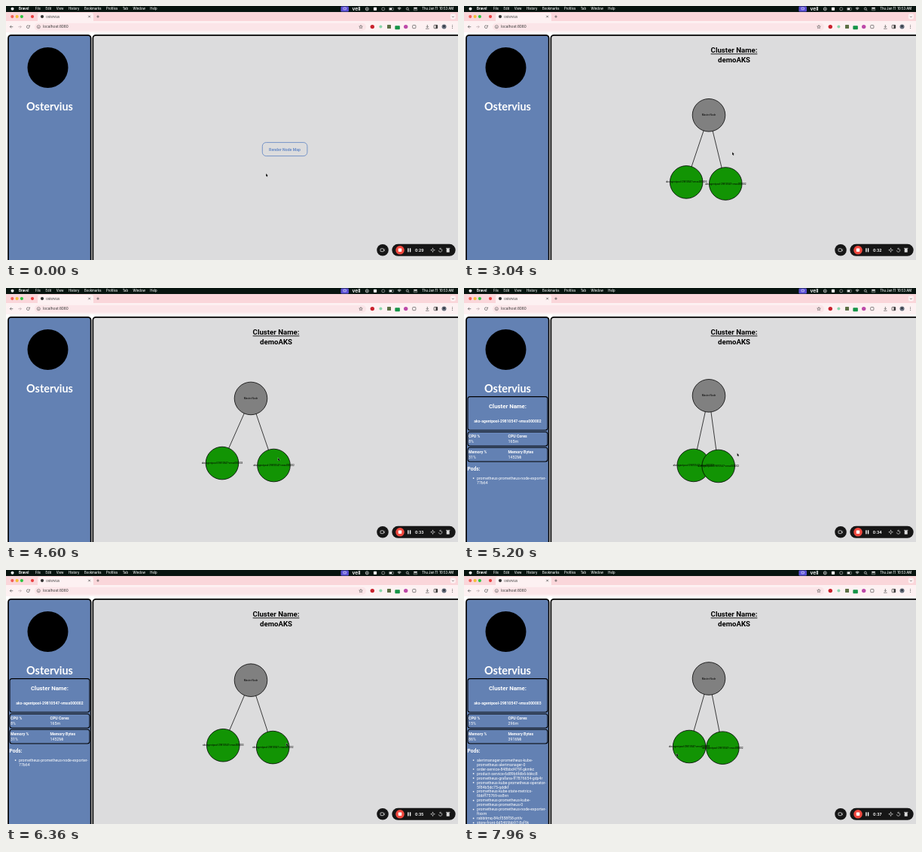
Animation, 600 px wide and 338 px high, one loop 8000 ms. Source, as an HTML page with a canvas:

```html
<!DOCTYPE html>
<html lang="en">
<head>
<meta charset="utf-8">
<title>Ostervius</title>
<style>
html, body { margin: 0; width: 100%; height: 100%; overflow: hidden; background: #fff; }
canvas { display: block; width: 600px; height: 338px; }
</style>
</head>
<body>
<canvas id="stage"></canvas>
<script>
const LOOP = 8000;
const APP = 'Ostervius';
const SANS = 'Roboto, sans-serif';
const UI = 'Inter, sans-serif';
const INK = '#555';
const POOL = 'aks-agentpool-29810547-vmss00000';

// Clicks that lay the graph out anew, and the node shown after each
const CLICKS = [{ at: 2600 }, { at: 5120, node: 2 }, { at: 7700, node: 3 }];
// Pointer stops: departure time and place
const HOME = { x: 345, y: 222.7 };
const STOPS = [
  { at: 400, x: 356, y: 194.3 }, { at: 3500, x: 361, y: 225.7 },
  { at: 4800, x: 362.5, y: 219.6 }, { at: 5260, x: 422, y: 183 },
  { at: 6020, x: 310.3, y: 288.4 }, { at: 7200, x: 282, y: 243.8 }
];
const NODES = {
  2: {
    stats: ['8%', '165m', '31%', '1452Mi'],
    pods: [['prometheus-prometheus-node-exporter-', '77b64']]
  },
  3: {
    stats: ['15%', '296m', '86%', '3916Mi'],
    pods: [
      ['alertmanager-prometheus-kube-', 'prometheus-alertmanager-0'],
      ['order-service-848bbd479f-gkmkc'],
      ['product-service-6d89b6fdb6-bbkc8'],
      ['prometheus-grafana-ff7876654-gdp4r'],
      ['prometheus-kube-prometheus-operator-', '5f84b5dc75-qddkf'],
      ['prometheus-kube-state-metrics-', '6bbff75769-ss8vn'],
      ['prometheus-prometheus-kube-', 'prometheus-prometheus-0'],
      ['prometheus-prometheus-node-exporter-', 'ftxxm'],
      ['rabbitmq-84cf558f58-pttlv'],
      ['store-front-6d5469bb97-8sf9k']
    ]
  }
};

const canvas = document.getElementById('stage');
const ratio = window.devicePixelRatio || 1;
canvas.width = 600 * ratio;
canvas.height = 338 * ratio;
const g = canvas.getContext('2d');
g.scale(ratio, ratio);

// Returns the width of the text
function text(str, x, y, size, color, { weight = 400, font = SANS, align = 'left' } = {}) {
  g.font = `${weight} ${size}px ${font}`;
  g.textAlign = align;
  g.fillStyle = color;
  g.fillText(str, x, y);
  return g.measureText(str).width;
}

function paint(fill, stroke, width) {
  if (fill) { g.fillStyle = fill; g.fill(); }
  if (stroke) { g.strokeStyle = stroke; g.lineWidth = width; g.stroke(); }
}

function rect(x, y, w, h, r, fill, stroke, width = 0.7) {
  g.beginPath();
  g.roundRect(x, y, w, h, r);
  paint(fill, stroke, width);
}

function box(x, y, w, h, r, fill, stroke, width) {
  rect(x - w / 2, y - h / 2, w, h, r, fill, stroke, width);
}

function disc(x, y, r, fill, stroke, width = 0.7) {
  g.beginPath();
  g.arc(x, y, r, 0, Math.PI * 2);
  paint(fill, stroke, width);
}

function arc(x, y, r, from, to, color, width = 0.7) {
  g.beginPath();
  g.arc(x, y, r, from, to);
  paint(null, color, width);
}

function line(x1, y1, x2, y2, color, width = 0.7) {
  g.beginPath();
  g.moveTo(x1, y1);
  g.lineTo(x2, y2);
  paint(null, color, width);
}

// Chevron with its tip at x, y, pointing along angle
function chevron(x, y, angle, color, size = 1.8) {
  g.save();
  g.translate(x, y);
  g.rotate(angle);
  g.beginPath();
  g.moveTo(-size, -size);
  g.lineTo(0, 0);
  g.lineTo(-size, size);
  paint(null, color, 0.7);
  g.restore();
}

function plus(x, y, r, color) {
  line(x - r, y, x + r, y, color);
  line(x, y - r, x, y + r, color);
}

// Draws each icon at an even pitch
function row(x, y, pitch, icons) {
  icons.forEach((icon, i) => icon(x + i * pitch, y));
}

function lens(x, y) {
  disc(x, y - 0.3, 1.5, null, '#fff', 0.6);
  line(x + 1.1, y + 0.8, x + 2.5, y + 2.2, '#fff', 0.6);
}

function menuBar() {
  g.fillStyle = '#07140f';
  g.fillRect(0, 0, 600, 8);
  disc(8.5, 3.8, 2, '#fff');
  text('Bravel', 17, 5.3, 4.4, '#fff', { weight: 700, font: UI });
  let x = 39;
  for (const name of ['File', 'Edit', 'View', 'History', 'Bookmarks', 'Profiles', 'Tab', 'Window', 'Help'])
    x += 6.5 + text(name, x, 5.3, 4.2, '#f4f6f5', { weight: 500, font: UI });

  box(449.7, 4, 10.5, 7, 1.2, '#5b50d6');
  box(449.7, 3.5, 3.5, 2.6, 0.4, null, '#fff', 0.6);
  text('vell', 459.5, 5.7, 6.6, '#fff', { weight: 600, font: UI });
  row(479.3, 3.9, 10.7, [
    (x, y) => { disc(x, y, 2, null, '#fff'); disc(x, y, 0.7, '#fff'); },
    (x, y) => box(x, y, 4.2, 4.2, 0.8, '#eee'),
    (x, y) => box(x, y, 4, 3.4, 1.4, null, '#bbb'),
    (x, y) => { box(x, y, 6, 3.4, 0.9, null, '#ccc', 0.5); box(x - 0.8, y, 3.2, 2.2, 0.4, '#fff'); },
    (x, y) => [1, 2, 3].forEach(k => arc(x, y + 1.8, k * 1.2, -2.3, -0.84, '#fff')),
    lens,
    (x, y) => { box(x, y - 1.1, 5, 1.6, 0.8, '#fff'); box(x, y + 1.1, 5, 1.6, 0.8, null, '#fff', 0.4); }
  ]);
  text('Thu Jan 11  10:53 AM', 594, 5.4, 4.2, '#fff', { weight: 500, font: UI, align: 'right' });
}

function browser() {
  g.fillStyle = '#fad6da';
  g.fillRect(0, 8, 600, 12);
  rect(42, 9, 74, 14, 3, '#fdf1f2');
  g.fillStyle = '#fdf1f2';
  g.fillRect(0, 20, 600, 15);
  row(8.3, 14.1, 6.3, ['#f25f57', '#f6bd36', '#2dc540'].map(c => (x, y) => disc(x, y, 2.1, c)));
  disc(35, 14.1, 2.1, '#ea3f3f');
  disc(48, 14.1, 2.1, '#333');
  text(APP, 53, 15.5, 4, '#333', { font: UI });
  line(109.3, 12.8, 111.9, 15.4, '#444');
  line(111.9, 12.8, 109.3, 15.4, '#444');
  plus(122, 14.1, 1.7, '#444');
  box(593.4, 14, 7, 7, 2, '#fdf1f2');
  chevron(593.4, 15, Math.PI / 2, '#444', 1.2);

  row(7.3, 27.7, 11, [
    (x, y) => { line(x - 2, y, x + 2, y, INK); chevron(x - 2, y, Math.PI, INK); },
    (x, y) => { line(x - 2, y, x + 2, y, '#bba9ad'); chevron(x + 2, y, 0, '#bba9ad'); },
    (x, y) => { arc(x, y, 1.9, 0.2, 5.3, INK); chevron(x + 2.2, y - 0.6, 0.8, INK, 1.1); }
  ]);
  rect(38, 22.8, 440, 10, 5, '#fbe5e8');
  disc(43.3, 27.7, 2.1, null, INK, 0.6);
  line(43.3, 27.3, 43.3, 28.9, INK);
  text('localhost:8080', 49, 29.4, 4.8, '#333', { font: UI });

  g.beginPath();
  for (let i = 0; i < 10; i++) {
    const a = -Math.PI / 2 + i * Math.PI / 5, r = i % 2 ? 1.1 : 2.4;
    g.lineTo(471 + r * Math.cos(a), 27.8 + r * Math.sin(a));
  }
  g.closePath();
  paint(null, INK, 0.6);
  row(486.3, 27.6, 11.1, [
    (x, y) => disc(x, y, 2.7, '#c9222d'),
    (x, y) => disc(x, y, 2, '#8ad6ab'),
    (x, y) => box(x, y, 5, 5, 0.5, '#5d7045'),
    (x, y) => box(x, y + 1.2, 6.5, 5, 0.8, '#159447'),
    (x, y) => disc(x, y, 2.7, '#bd49a9'),
    (x, y) => box(x, y, 4.2, 4.2, 0.8, null, INK)
  ]);
  row(559.3, 27.6, 11.1, [
    (x, y) => {
      line(x, y - 2.6, x, y + 1, INK);
      chevron(x, y + 1, Math.PI / 2, INK, 1.5);
      line(x - 2.3, y + 2.6, x + 2.3, y + 2.6, INK);
    },
    (x, y) => { box(x, y, 4.6, 4.4, 0.6, null, '#333'); box(x + 1.2, y, 2.2, 4.4, 0, '#333'); },
    (x, y) => { disc(x, y, 3, '#626a78'); disc(x, y - 0.7, 1.1, '#22272f'); },
    (x, y) => [-1, 0, 1].forEach(k => disc(x, y + k * 1.9, 0.5, '#444'))
  ]);
}

function sidebar(id) {
  rect(3, 38.8, 109.6, 320, 4, '#6381b3', '#000', 1.7);
  disc(55.5, 82, 27, '#000');
  text(APP, 58, 139.2, 14.4, '#fff', { weight: 700, font: 'Lato, sans-serif', align: 'center' });
  if (!id) return;

  const { stats, pods } = NODES[id];
  const bold = { weight: 700 }, mid = { weight: 700, align: 'center' };
  rect(5, 144.6, 106, 44.6, 3, null, '#000', 1.05);
  text('Cluster Name:', 58, 160, 7.8, '#fff', mid);
  text(POOL + id, 58, 179, 5.05, '#fff', mid);
  ['CPU', 'Memory'].forEach((kind, i) => {
    const y = 199.2 + 20.8 * i;
    rect(5, y - 7.8, 106, 18.9, 3, null, '#000', 1.05);
    [kind + ' %', kind + (i ? ' Bytes' : ' Cores')].forEach((label, j) => {
      const x = 6 + 52.5 * j;
      text(label, x, y, 5.2, '#fff', bold);
      text(stats[2 * i + j], x, y + 7, 5.3, '#fff');
    });
  });
  text('Pods:', 4.5, 243.3, 6.6, '#fff', bold);
  let y = 254.8;
  for (const pod of pods) {
    disc(12.6, y - 1.7, 0.85, '#fff');
    for (const part of pod) {
      text(part, 17, y, 5.2, '#fff');
      y += 5.95;
    }
  }
}

// Nodes repel each other and settle exponentially
function graph(age) {
  const rest = 0.62 * Math.exp(-age / 480);
  const spread = 34.6 * (1 - rest);
  const top = { x: 325, y: 147 - 7 * rest, name: 'Master Node', color: '#808080' };
  const kids = [
    { x: 321.2 - spread, y: 233 + 5.6 * rest, name: POOL + 3, color: '#129404' },
    { x: 321.2 + spread, y: 236 + 1.9 * rest, name: POOL + 2, color: '#129404' }
  ];
  for (const k of kids) line(top.x, top.y, k.x, k.y, '#111', 0.8);
  const all = [top, ...kids];
  for (const n of all) disc(n.x, n.y, 21.8, n.color, '#000', 0.8);
  for (const n of all) text(n.name, n.x, n.y + 1.1, 3.2, '#000', { align: 'center' });
}

function mainPanel(age) {
  rect(115.4, 38.8, 490, 320, 4, '#dcdcdd', '#000', 1.7);
  if (age === undefined) {
    box(370.1, 190.6, 59.6, 18, 5, null, '#6a8cc6', 0.9);
    text('Render Node Map', 370, 192.5, 5.2, '#6a8cc6', { weight: 700, align: 'center' });
    return;
  }
  const head = { weight: 700, align: 'center' };
  const w = text('Cluster Name:', 358.5, 62.4, 9.65, '#000', head);
  g.fillRect(358.5 - w / 2, 63.4, w, 0.9);
  text('demoAKS', 358.5, 75, 9.6, '#000', head);
  graph(age);
}

function recorder(t) {
  const y = 324.8, dark = '#161616', pale = '#ddd';
  disc(500, y, 7.8, dark);
  box(499.2, y, 4.4, 3.8, 0.8, null, '#fff');
  chevron(501.6, y, Math.PI, '#fff', 1.3);
  box(554.5, y, 84.4, 16, 8, dark);
  disc(523, y, 5.8, '#f0483e');
  box(523, y, 4.4, 4.4, 0.7, '#fff');
  for (const x of [533.9, 536.6]) box(x, y, 1.4, 5.2, 0.4, '#fff');
  const sec = 29 + Math.floor((t + 410) / 1030);
  text('0:' + sec, 548.7, 326.6, 5, '#fff', { weight: 700, font: UI, align: 'center' });
  row(566.5, y, 10.1, [
    (x, y) => { plus(x, y, 3, pale); disc(x, y, 1.5, dark, pale, 0.6); },
    (x, y) => { arc(x, y + 0.3, 2.2, -1.9, 3.1, pale); chevron(x - 1, y - 1.8, Math.PI, pale, 1.3); },
    (x, y) => { box(x, y + 0.6, 4, 4.7, 0.6, pale); line(x - 2.7, y - 2.4, x + 2.7, y - 2.4, '#fff'); }
  ]);
}

// Longer trips take longer
function pointer(t) {
  let { x, y } = HOME;
  for (const s of STOPS) {
    const time = 120 + 4 * Math.hypot(s.x - x, s.y - y);
    const u = Math.min(1, Math.max(0, (t - s.at) / time)), e = u * u * (3 - 2 * u);
    x += (s.x - x) * e;
    y += (s.y - y) * e;
    if (u < 1) break;
  }
  g.beginPath();
  g.moveTo(x, y);
  g.lineTo(x, y + 4);
  g.lineTo(x + 2.8, y + 2.8);
  g.closePath();
  paint('#000', '#fff', 0.3);
  line(x + 0.9, y + 2.6, x + 1.8, y + 4.5, '#000', 0.8);
}

function draw(t) {
  const last = CLICKS.filter(c => t >= c.at).pop();
  g.fillStyle = '#fff';
  g.fillRect(0, 0, 600, 338);
  menuBar();
  browser();
  sidebar(last && last.node);
  mainPanel(last && t - last.at);
  recorder(t);
  pointer(t);
}

const begin = performance.now();
function loop(now) {
  draw(Math.max(0, now - begin) % LOOP);
  requestAnimationFrame(loop);
}
draw(0);
requestAnimationFrame(loop);
</script>
</body>
</html>
```
